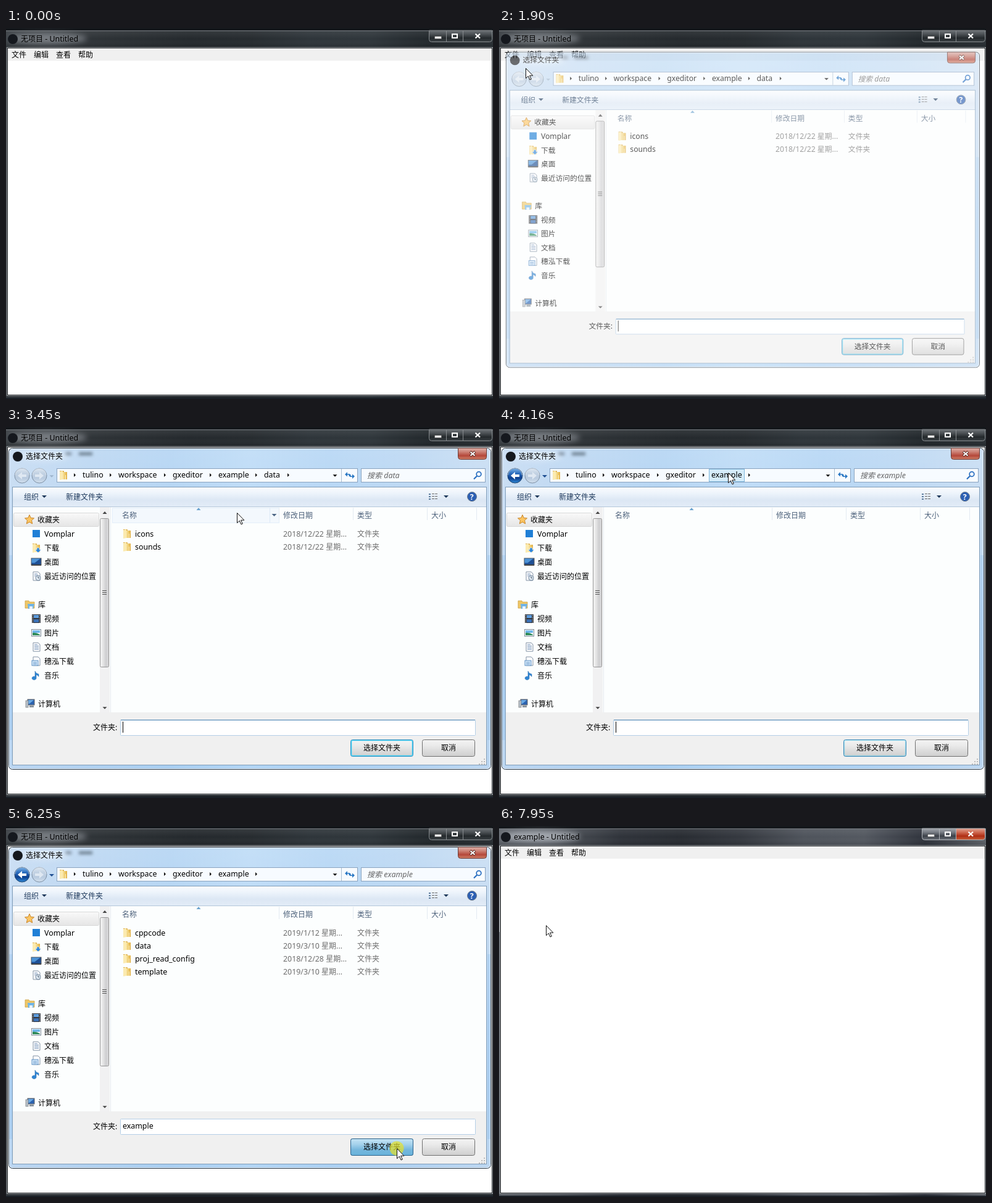
Write an HTML page that moves like this. It is 789 px wide and 602 px high and loops after 8 s.

```html
<!DOCTYPE html>
<html lang="zh-CN">
<head>
<meta charset="utf-8">
<title>Open project</title>
<style>
  html, body { margin: 0; width: 100%; height: 100%; overflow: hidden; background: #fff; }
  svg { display: block; width: 789px; height: 602px; }
  text { font: 12.4px "Noto Sans", "Noto Sans CJK SC", "Noto Sans CJK", sans-serif; white-space: pre; }
  .cjk { font: 12px "Noto Sans CJK SC", "Noto Sans CJK", sans-serif; }
  .it, .it .cjk { font-style: italic; }
</style>
</head>
<body>
<svg id="stage" viewBox="0 0 789 602"></svg>
<script>
const LOOP = 8000;

// Drawing helpers
const rect = (x, y, w, h, fill, more = '') =>
  `<rect x="${x}" y="${y}" width="${w}" height="${h}" fill="${fill}" ${more}/>`;
const box = (x, y, w, h, fill, stroke, r = 0) =>
  rect(x + .5, y + .5, w - 1, h - 1, fill, `stroke="${stroke}" rx="${r}"`);
const path = (d, fill, more = '') => `<path d="${d}" fill="${fill}" ${more}/>`;
const line = (d, stroke, w = 1, more = '') =>
  path(d, 'none', `stroke="${stroke}" stroke-width="${w}" ${more}`);
const circle = (x, y, r, fill, more = '') => `<circle cx="${x}" cy="${y}" r="${r}" fill="${fill}" ${more}/>`;
const group = (id, body) => `<g id="${id}">${body}</g>`;
const at = (x, y, body, flip = 1) => `<g transform="translate(${x} ${y}) scale(${flip} 1)">${body}</g>`;
const text = (x, mid, s, fill = '#000', more = '') =>
  `<text x="${x}" y="${Math.round(mid + 4.9)}" fill="${fill}" ${more}>` +
  s.replace(/[\u4e00-\u9fff]+/g, m => `<tspan class="cjk">${m}</tspan>`) + '</text>';
const grad = (id, dir, ...stops) =>
  `<linearGradient id="${id}" x2="${dir === 'h' ? 1 : 0}" y2="${dir === 'h' ? 0 : 1}">` +
  stops.map((c, i) => `<stop offset="${i / (stops.length - 1)}" stop-color="${c}"/>`).join('') +
  '</linearGradient>';
const down = (x, y, fill, s = 4) => path(`M${x - s} ${y - s / 2}h${2 * s}l${-s} ${s}z`, fill);
const right = (x, y, fill, s = 3) => path(`M${x - s / 2} ${y - s}v${2 * s}l${s} ${-s}z`, fill);

const defs = `<defs>
  ${grad('idle', 'h', '#33383d', '#2d3236', '#262b2f', '#202529', '#22272b', '#2a3136', '#2b3237', '#1d2327', '#252b30')}
  ${grad('live', 'h', '#5a5f66', '#484d54', '#2b2f36', '#24282e', '#31353c', '#4b5058', '#50555d', '#2b2f38', '#5b6067')}
  ${grad('sheen', 'v', 'rgba(255,255,255,.1)', 'rgba(255,255,255,.02)', 'rgba(0,0,0,.14)')}
  ${grad('capBtn', 'v', '#6d7276', '#4b5054', '#24292c', '#3b4145')}
  ${grad('capLit', 'v', '#a4a8ae', '#777c84', '#3c4149', '#6a7078')}
  ${grad('red', 'v', '#e2a594', '#cf6a52', '#b02e14', '#c8613c')}
  ${grad('redSoft', 'v', '#e0b0a8', '#cc8074', '#b5483a', '#cf8068')}
  ${grad('glass', 'h', '#bfd7f1', '#b2d1f0', '#a9cef1', '#b4d6f5', '#abd0f3', '#b2d2f1', '#c0d8f1')}
  ${grad('glassV', 'v', 'rgba(255,255,255,.22)', 'rgba(255,255,255,.1)', 'rgba(150,200,245,.1)', 'rgba(140,195,240,.15)', 'rgba(160,205,240,.1)')}
  ${grad('bar', 'v', '#fafcfe', '#ecf3fb', '#dce7f4', '#e2ecf7')}
  ${grad('row', 'v', '#f9f9f9', '#e5e5e5')}
  ${grad('thumb', 'h', '#f5f5f5', '#e6e6e6', '#cfcfd1', '#d9d9da')}
  ${grad('btn', 'v', '#f3f3f3', '#ebebeb', '#dcdcdc', '#cfcfcf')}
  ${grad('btnHot', 'v', '#eaf6fd', '#d9f0fc', '#bee6fd', '#a7d9f5')}
  ${grad('btnDown', 'v', '#c4e3f4', '#a5d2ec', '#75b6dc', '#68b3db')}
  ${grad('tip', 'v', '#ffffff', '#e4e5f0')}
  ${grad('folder', 'h', '#f8e3a0', '#eecb6c', '#e0ae45')}
  ${grad('nav', 'v', '#7fb3e6', '#2d6fc0', '#0d3f8f', '#2f8bd8')}
  ${grad('navOff', 'v', '#dfe8f2', '#c3d2e3', '#b9cbdf', '#d3e0ee')}
  <filter id="soft" x="-40%" y="-80%" width="180%" height="260%"><feGaussianBlur stdDeviation="5"/></filter>
  <filter id="smudge" x="-50%" y="-100%" width="200%" height="300%"><feGaussianBlur stdDeviation="2.5"/></filter>
  </defs>`;

// Main window
const capButtons = (fill, close, edge) =>
  path('M685.5 4h28v18.500h-24q-4 0-4-4z', `url(#${fill})`, `stroke="${edge}"`) +
  path('M713.500 4h27v18.500h-27z', `url(#${fill})`, `stroke="${edge}"`) +
  path('M740.500 4h47v14.500q0 4-4 4h-43z', `url(#${close})`, `stroke="${edge}"`) +
  rect(694.5, 13.5, 11, 4, '#fff', 'stroke="#444" stroke-width=".6"') +
  rect(723, 10, 8, 6, 'none', 'stroke="#fff" stroke-width="2"') +
  line('M760.5 9.5l7.5 7M768 9.5l-7.5 7', '#fff', 2.2);

const frame = (fill, btn, close, edge) =>
  rect(0, 0, 789, 602, `url(#${fill})`) + rect(0, 4, 789, 28, 'url(#sheen)') +
  rect(0, 0, 789, 4, '#14171b') + rect(0, 4, 789, 1, '#7c8186') + capButtons(btn, close, edge);

const mainWindow =
  group('idleFrame', frame('idle', 'capBtn', 'capBtn', '#878b8e')) +
  group('liveFrame', frame('live', 'capLit', 'red', '#b0b4b9') + rect(0, 32, 1, 140, '#a5a9ad')) +
  rect(1, 31, 788, 566, '#9b9fa3') + rect(2, 32, 786, 564, '#181b1e') +
  rect(3, 33, 784, 562, '#fff') + rect(3, 33, 784, 20, '#f0f0f0') +
  rect(0, 600, 789, 2, '#1a2027') +
  group('glow', '<ellipse cx="67" cy="17" rx="64" ry="9" fill="#b9bec5" filter="url(#soft)"/>') +
  circle(11, 18, 8, '#15181e') +
  group('titleA', text(24, 17, '无项目 - Untitled')) +
  group('titleB', text(24, 17, 'example - Untitled')) +
  group('menuHot', rect(3, 33, 36, 19, '#e3e3e3')) +
  ['文件', '编辑', '查看', '帮助'].map((s, i) => text(9 + 36 * i, 43, s)).join('');

const shortcut = (x, y, s) => text(x, y, s, '#9a8f86', 'style="font-size:12.9px"');
const menu =
  box(3, 51, 158, 137, '#fefefe', '#b4b4b4') + rect(4, 54, 156, 24, '#e9e9e9') +
  text(30, 66, '打开项目...') +
  text(30, 90, '打开...', '#a19d98') + shortcut(96, 90, 'Ctrl+O') +
  text(30, 114, '打开最近') + right(150.5, 114, '#444', 4) +
  text(30, 138, '保存') + shortcut(98, 138, 'Ctrl+S') +
  rect(4, 155, 156, 1, '#e0e0e0') + text(30, 173, '退出');

// Icons, 16 px each
const folder = path('M2 1h6l1 1v13H2z', '#d9a843') + path('M2 2l5-1v14l-5 1z', '#fbeab0') +
  path('M7 3h7v12H7z', 'url(#folder)') + line('M11.5 8v7', '#fdf0c4');
const page = path('M3 1h8l3 3v11H3z', '#fdfdff', 'stroke="#8292a4"');
const icons = {
  star: path('M8 .5l2.2 5 5.3.5-4 3.6 1.2 5.4L8 12.2 3.3 15l1.2-5.4-4-3.6 5.3-.5z', '#fbc563', 'stroke="#c98424"'),
  brand: rect(2, 2, 12, 12, '#1f7fd6'),
  fetch: folder + path('M9 8h4v3h3l-5 5-5-5h3z', '#2f86d8', 'stroke="#fff" stroke-width=".6"'),
  screen: rect(0, 2, 16, 11, '#1e4f94', 'stroke="#555"') + path('M.5 2.5h14l-9 7h-5z', '#4d93d6') + rect(0, 12, 16, 2, '#444'),
  recent: page + line('M5 4h5M5 6h6M5 8h4', '#8fa6c2') + circle(11, 11, 4, '#dfe9f2', 'stroke="#72879c"') + line('M11 8.5V11h2', '#456'),
  library: path('M0 2h6l1 2h8v10H0z', '#eec768', 'stroke="#c69a3c" stroke-width=".7"') + path('M4 7h11l-2 8H5z', '#70b4e6') + rect(7, 11, 5, 4, '#e9f3fb'),
  film: rect(1, 1, 14, 14, '#30343b') + rect(4, 2, 8, 5, '#5e9cdc') + rect(4, 9, 8, 5, '#3c72b8') +
    line('M2.5 2v13M13.5 2v13', '#e4e4e4', 1, 'stroke-dasharray="1.5 1.5"'),
  photo: rect(.5, 2.5, 15, 11, '#fff', 'stroke="#7d8b99"') + rect(2, 4, 12, 4, '#6fb6ea') + path('M2 12V8q6-1 12 3v1z', '#2f8a5a'),
  page: page + line('M5 4h5M5 6.5h7M5 9h7M5 11.5h7', '#6f8fb5'),
  stack: page + rect(1, 7, 10, 8, '#d8eafa', 'stroke="#5b8fc4"') + line('M3 10h6M3 12.5h6', '#5b8fc4'),
  note: path('M6 1q1 4 6 5v4q-2-3-4-3v5a3.5 2.8 0 1 1-2-2z', '#2f86d4', 'stroke="#1b5ea4" stroke-width=".5"'),
  pc: rect(4, 1, 11, 9, '#2a62b0', 'stroke="#666"') + path('M5 2h9l-7 6H5z', '#6aa9e4') + rect(1, 3, 4, 11, '#b9c2cb', 'stroke="#666" stroke-width=".6"') + rect(7, 11, 7, 3, '#8d969e')
};

// Dialog
const side = [
  [30, 150, 'star', '收藏夹'], [41, 173, 'brand', 'Vomplar'], [41, 196, 'fetch', '下载'],
  [41, 219, 'screen', '桌面'], [41, 242, 'recent', '最近访问的位置'], [31, 288, 'library', '库'],
  [41, 311, 'film', '视频'], [41, 334, 'photo', '图片'], [41, 357, 'page', '文档'],
  [41, 380, 'stack', '穗泓下载'], [41, 403, 'note', '音乐'], [31, 449, 'pc', '计算机']
].map(([x, y, icon, s]) => at(x, y - 8, icons[icon]) + text(x + 21, y, s)).join('');

const files = rows => rows.map(([name, date], i) => {
  const y = 173 + 21 * i;
  return at(188, y - 8, folder) + text(209, y, name) +
    text(449, y, date + ' 星期...', '#6d6d6d') + text(569, y, '文件夹', '#6d6d6d');
}).join('');

const navButton = (x, dir, on) =>
  circle(x, 79, 12, on ? 'url(#nav)' : 'url(#navOff)', `stroke="${on ? '#24466e' : '#7d90a5'}"`) +
  line(`M${x - 11} 78a11 11 0 0 1 22 0`, 'rgba(255,255,255,.5)') +
  at(x, 79, path('M-7-2h7v-4l7 6-7 6v-4h-7z', on ? '#fff' : '#dfe8f2'), dir);

const crumbs = [[124, 'tulino'], [182, 'workspace'], [270, 'gxeditor'], [344, 'example']]
  .map(([x, s]) => text(x, 77, s)).join('') +
  [111, 169, 257, 331, 405].map(x => right(x + .5, 78, '#111')).join('');

const glass =
  rect(4.5, 34.5, 781, 521, 'url(#glass)', 'rx="6" stroke="#1f2f3f"') +
  rect(5, 35, 780, 520, 'url(#glassV)', 'rx="6"') +
  rect(5.5, 35.5, 779, 519, 'none', 'rx="5" stroke="rgba(255,255,255,.7)"') +
  rect(5, 208, 5, 300, 'rgba(90,160,225,.15)') + rect(780, 208, 5, 300, 'rgba(90,160,225,.15)') +
  rect(96, 41, 10, 5, '#4c5a68', 'filter="url(#smudge)" opacity=".6"') +
  rect(118, 41, 22, 5, '#4c5a68', 'filter="url(#smudge)" opacity=".7"') +
  '<ellipse cx="62" cy="47" rx="40" ry="7" fill="#fff" opacity=".4" filter="url(#soft)"/>' +
  circle(19, 48, 8, '#15181e') + text(32, 47, '选择文件夹') +
  path('M732.5 34.5h46v14q0 4-4 4h-38q-4 0-4-4z', 'url(#redSoft)', 'stroke="#6b3a34"') +
  line('M752 40l8 7M760 40l-8 7', '#5a2a22', 4) + line('M752.5 40.5l7 6M759.5 40.5l-7 6', '#fff', 2.2);

const address =
  box(82, 67, 488, 23, '#f7fbff', '#8ba4c0') + rect(543, 68, 1, 21, '#a9bdd2') +
  at(85, 70, folder) +
  group('crumbHot', box(340, 68, 58, 21, '#d5ecfa', '#7fb8dc')) + crumbs +
  group('crumbData', text(418, 77, 'data') + right(457.5, 78, '#111')) +
  down(533, 79, '#111', 3.5) +
  path('M549 77l4-4v3h4v4h-1.5v-2.5H553v3zM565 80l-4 4v-3h-4v-4h1.5v2.500h2.500v-3z', '#2a78c4') +
  box(575, 67, 202, 23, '#f7fbff', '#8ba4c0') +
  group('findA', text(585, 78, '搜索 data', '#666', 'class="it"')) +
  group('findB', text(585, 78, '搜索 example', '#666', 'class="it"')) +
  circle(766, 76.5, 3.8, 'none', 'stroke="#2a6fc0" stroke-width="1.8"') + line('M763 79.5l-5 5', '#2a6fc0', 2.2) +
  navButton(54, 1, false) +
  group('fwdHot', circle(54, 79, 11.5, 'rgba(255,255,255,.4)')) +
  group('backOff', navButton(26, -1, false) + down(74, 80, '#9db4cc', 3.5)) +
  group('backOn', navButton(26, -1, true) + down(74, 80, '#1f4f92'));

const toolbar =
  rect(10, 97, 769, 452, '#7f9db9') + rect(11, 98, 767, 31, 'url(#bar)') + rect(11, 129, 767, 1, '#b4c6da') +
  text(29, 113, '组织', '#1e395b') + down(62, 113, '#1e395b') + text(97, 113, '新建文件夹', '#1e395b') +
  [108, 112, 116].map(y => rect(685, y, 3, 2, '#5f7f9f') + rect(690, y, 4, 1, '#666') + rect(695, y, 4, 1, '#666')).join('') +
  down(713, 113, '#1e395b') +
  circle(755, 113, 7.5, '#2b5fb4', 'stroke="#6f7d8c"') +
  text(751.8, 113, '?', '#fff', 'style="font-weight:700"');

const panes =
  rect(11, 130, 767, 333, '#fcfefe') +
  box(12, 139, 139, 23, 'url(#row)', '#d9d9d9', 2) + side +
  rect(152, 130, 16, 333, '#f1f1f2') + rect(169, 130, 1, 333, '#e6eaf0') +
  box(152, 148, 15, 242, 'url(#thumb)', '#979797', 2) +
  [265, 268, 271].map(y => rect(156, y, 7, 1, '#555')).join('') +
  path('M156.5 141h7l-3.5-4z', '#444') + down(160, 456, '#444', 3.5) +
  group('headHot', box(172, 131, 271, 25, '#f3f8fd', '#e3eefa') + rect(427, 131, 1, 24, '#dce9f6') + down(434.5, 143, '#4b6584')) +
  path('M308.5 135l3.5-4 3.5 4z', '#6ba3cf') +
  [442, 562, 682, 762].map(x => rect(x, 131, 1, 20, '#e3eaf2')).join('') +
  [[188, '名称'], [449, '修改日期'], [569, '类型'], [689, '大小']].map(([x, s]) => text(x, 143, s, '#4c607a')).join('') +
  group('listA', files([['icons', '2018/12/22'], ['sounds', '2018/12/22']])) +
  group('listB', files([['cppcode', '2019/1/12'], ['data', '2019/3/10'], ['proj_read_config', '2018/12/28'], ['template', '2019/3/10']]));

const footer =
  rect(11, 463, 767, 85, '#f0f0f0') +
  text(141, 487, '文件夹:') + box(185, 475, 576, 26, '#fff', '#b5cfe7', 1) +
  group('focus', rect(186, 475, 574, 1, '#3d7bad')) +
  group('caret', rect(189, 478, 1, 18, '#000')) +
  group('chosen', rect(189, 478, 50, 18, '#3399ff') + text(189, 486, 'example', '#fff')) +
  group('typed', text(189, 486, 'example')) +
  box(558, 507, 102, 28, 'url(#btn)', '#3c7fb1', 3) +
  group('okHot', box(558, 507, 102, 28, 'url(#btnHot)', '#3c7fb1', 3)) +
  rect(559.5, 508.5, 99, 25, 'none', 'id="pulse" rx="2" stroke="#35cdf4" stroke-width="1.6"') +
  group('okDown', box(558, 507, 102, 28, 'url(#btnDown)', '#2c628b', 3)) +
  text(579, 520, '选择文件夹') +
  box(674, 507, 86, 28, 'url(#btn)', '#707070', 3) + text(705, 520, '取消') +
  [[774, 539], [774, 543], [774, 547], [770, 543], [770, 547], [766, 547]]
    .map(([x, y]) => rect(x, y - 1, 2, 2, '#bcbcbc')).join('');

const tooltip = box(43, 84, 37, 22, 'url(#tip)', '#767676', 2) + text(49, 95, '前进', '#444');

const pointer =
  group('press', circle(0, 0, 11.5, '#e6e128', 'opacity=".7"')) +
  path('M.5.5v16.2l3.8-3.6 2.7 5.9 2.300-1-2.7-5.8h5.2z', '#fff', 'stroke="#111"');

const stage = document.getElementById('stage');
stage.innerHTML = defs + mainWindow + group('menu', menu) +
  group('dialog', glass + address + toolbar + panes + footer) +
  group('tooltip', tooltip) + group('cursor', pointer);
const parts = {};
stage.querySelectorAll('[id]').forEach(el => parts[el.id] = el);

// Mouse moves: first step, last step, step count, target
const moves = [
  [70, 370, 5, 23, 13], [670, 900, 4, 27, 43], [1200, 1360, 3, 43, 64], [1900, 1990, 2, 43, 66],
  [2650, 3450, 11, 374, 139], [3500, 3800, 5, 371, 74],
  [4310, 4880, 7, 338, 365], [4950, 5090, 3, 238, 536],
  [5190, 5350, 3, 330, 544], [5430, 5600, 3, 480, 510], [5670, 5800, 3, 633, 523],
  [6610, 6990, 6, 353, 305], [7300, 7520, 4, 130, 203], [7730, 7730, 1, 125, 201], [7880, 7950, 2, 76, 161]
];

function mouse(t) {
  let x = 624, y = 649;
  for (const [from, to, n, tx, ty] of moves) {
    if (t < from) break;
    const gap = (to - from) / Math.max(1, n - 1) || 1;
    const k = Math.min(1, (Math.floor((t - from) / gap + 1e-6) + 1) / n);
    x += (tx - x) * k;
    y += (ty - y) * k;
  }
  return [x, y];
}

const show = (id, on) => parts[id].setAttribute('display', on ? 'inline' : 'none');
const clamp = v => Math.max(0, Math.min(1, v));

function draw(t) {
  const within = (a, b) => t >= a && t < b;
  const [x, y] = mouse(t);
  const live = within(1050, 1760) || t >= 6340;
  const moved = t >= 4160, loaded = t >= 4310, done = t >= 6340;

  show('liveFrame', live);
  show('idleFrame', !live);
  parts.glow.setAttribute('opacity', live ? .8 : .5);
  show('titleA', !done);
  show('titleB', done);
  show('menu', within(1130, 1660));
  show('menuHot', within(1050, 1660));

  const fade = clamp((t - 1760) / 220) * (1 - clamp((t - 6330) / 100));
  const size = .95 + .05 * fade;
  show('dialog', fade > 0);
  parts.dialog.setAttribute('opacity', fade);
  parts.dialog.setAttribute('transform', `translate(395 295) scale(${size}) translate(-395 -295)`);

  show('crumbHot', within(3720, 4310));
  show('crumbData', !moved);
  show('findA', !moved);
  show('findB', moved);
  show('backOff', !moved);
  show('backOn', moved);
  show('fwdHot', within(1950, 2720));
  show('headHot', x > 172 && x < 442 && y > 130 && y < 156);
  show('listA', !moved);
  show('listB', loaded);

  show('focus', t < 6250);
  show('caret', !loaded && t >= 1890 && (t - 1890) % 1060 < 530);
  show('chosen', loaded && t < 6250);
  show('typed', t >= 6250);
  show('okHot', within(5700, 6250));
  show('okDown', t >= 6250);
  parts.pulse.setAttribute('opacity', .6 + .35 * Math.sin((t - 2900) / 320));
  show('tooltip', within(2420, 2720));

  show('cursor', t >= 70);
  parts.cursor.setAttribute('transform', `translate(${Math.round(x)} ${Math.round(y)})`);
  show('press', within(1050, 1200) || within(1570, 1680) || within(3900, 4080) || within(6250, 6340));
}

const start = performance.now();
(function tick() {
  draw((performance.now() - start) % LOOP);
  requestAnimationFrame(tick);
})();
</script>
</body>
</html>
```
